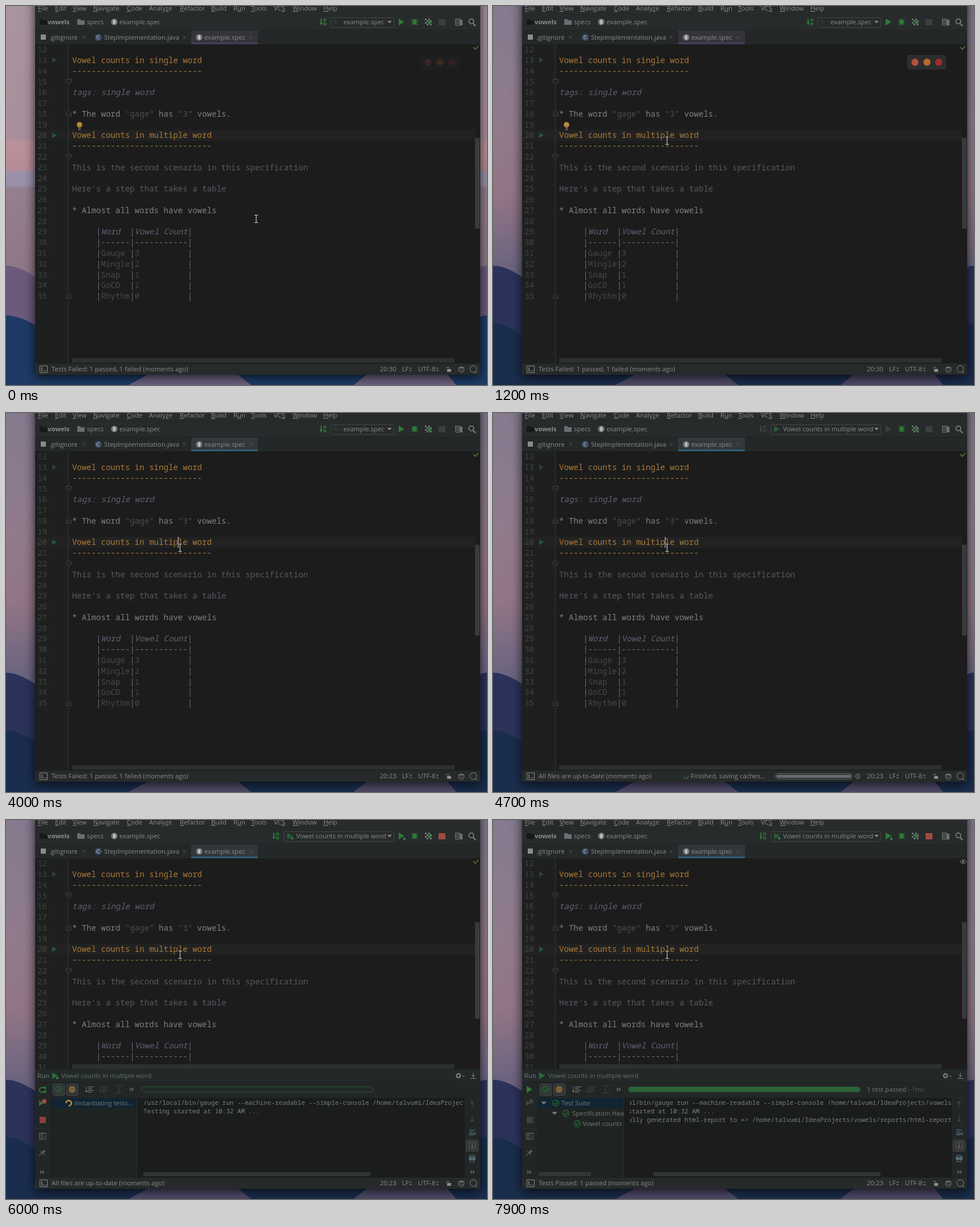
Animation of 844x664 px, one loop 8000 ms. Source, as an HTML page with a canvas:

```html
<!DOCTYPE html>
<html lang="en">
<head>
<meta charset="utf-8">
<title>Running a spec scenario</title>
<style>
  html, body { margin: 0; width: 100%; height: 100%; overflow: hidden; background: #14233c; }
  canvas { display: block; }
</style>
</head>
<body>
<canvas id="stage" width="844" height="664"></canvas>
<script>
const ctx = document.getElementById('stage').getContext('2d');
const LOOP = 8000, STEP = 100;
const COL = 8.451, ROW = 18.78, LOG_COL = 6.6;

const sans = "'Open Sans', 'Noto Sans', sans-serif";
const mono = "'Noto Sans Mono', monospace";
const UI = { css: '11.3px ' + sans, drop: 4 };
const BOLD = { css: 'bold 11.3px ' + sans, drop: 4 };
const CODE = { css: '14.085px ' + mono, drop: 4.9 };
const ITALIC = { css: 'italic 14.085px ' + mono, drop: 4.9 };
const LOG = { css: '11px ' + mono, drop: 3.9 };

const C = {
  bar: '#282b2b', editor: '#1c1c1c', gutter: '#1e1f1f', label: '#8b8c8c',
  icon: '#6d7070', dim: '#3f4242', green: '#2d7a38', red: '#a04a42',
  title: '#ab7a38', dash: '#a07a42', step: '#827e88', quote: '#4b5046',
  note: '#5b5762', tag: '#675f74', cell: '#464944', pipe: '#6f6880',
  panel: '#222626', panelText: '#747c78', panelIcon: '#525959', panelGreen: '#2a6a38'
};

// Drawing helpers
function rect(x, y, w, h, color) { ctx.fillStyle = color; ctx.fillRect(x, y, w, h); }
function frame(x, y, w, h, color, r = 0, fill) {
  ctx.beginPath();
  ctx.roundRect(x + .5, y + .5, w - 1, h - 1, r);
  if (fill) { ctx.fillStyle = fill; ctx.fill(); }
  ctx.strokeStyle = color; ctx.lineWidth = 1; ctx.stroke();
}
function trace(points) {
  ctx.beginPath();
  for (let i = 0; i < points.length; i += 2) ctx.lineTo(points[i], points[i + 1]);
}
function line(color, width, ...points) {
  trace(points);
  ctx.strokeStyle = color; ctx.lineWidth = width; ctx.stroke();
}
function poly(color, ...points) { trace(points); ctx.fillStyle = color; ctx.fill(); }
function dot(x, y, r, color) {
  ctx.beginPath(); ctx.arc(x, y, r, 0, 7);
  ctx.fillStyle = color; ctx.fill();
}
function ring(x, y, r, color, width = 1, from = 0, to = 2 * Math.PI) {
  ctx.beginPath(); ctx.arc(x, y, r, from, to);
  ctx.strokeStyle = color; ctx.lineWidth = width; ctx.stroke();
}
function text(str, x, y, color = C.label, font = UI) {
  ctx.font = font.css; ctx.fillStyle = color;
  ctx.fillText(str, x, y + font.drop);
}
function clipped(x, y, w, h, draw) {
  ctx.save();
  ctx.beginPath(); ctx.rect(x, y, w, h); ctx.clip();
  draw();
  ctx.restore();
}
function mix(t, keys) {
  const i = keys.findIndex(k => k[0] > t);
  if (i < 0) return keys[keys.length - 1][1];
  const [t0, a] = keys[i - 1], [t1, b] = keys[i];
  return a + (b - a) * (t - t0) / (t1 - t0);
}

// Icons
const play = (x, y, color = C.green, s = 5) => poly(color, x - s, y - s - 1, x + s, y, x - s, y + s + 1);
const down = (x, y, color = C.label, s = 4) => poly(color, x - s, y - s / 2, x + s, y - s / 2, x, y + s / 2);
function passed(x, y) {
  ring(x, y, 5.5, C.panelGreen, 1.3);
  line(C.panelGreen, 1.5, x - 3, y, x - .5, y + 2.5, x + 3.5, y - 2.5);
}
function cross(x, y, color = '#505353', s = 2.7) {
  line(color, 1, x - s, y - s, x + s, y + s);
  line(color, 1, x + s, y - s, x - s, y + s);
}
function chevrons(x, y) {
  for (const dx of [0, 4]) line(C.panelText, 1.2, x + dx, y - 2.5, x + dx + 2.5, y, x + dx, y + 2.5);
}
function folder(x, y, color) {
  rect(x - 6, y - 5, 6, 3, color);
  rect(x - 6, y - 3, 13, 8, color);
}
function specFile(x, y) {
  dot(x, y, 5.7, '#77797a');
  rect(x - 2, y - 3.5, 4, 7, '#c0c0c0');
}
function bug(x, y) {
  for (const d of [-3, 0, 3]) line(C.green, 1, x - 6, y + d * 1.4, x + 6, y + d * 1.4);
  dot(x, y, 4.2, C.green);
}
function coverage(x, y) {
  for (let i = 0; i < 16; i++) {
    if ((i + (i >> 2)) % 2 === 0) rect(x - 6 + i % 4 * 3, y - 6 + (i >> 2) * 3, 3, 3, C.icon);
  }
  play(x + 3, y + 1, C.green, 3.5);
}
function makeIcon(x, color) {
  poly(color, x - 6, 29, x, 29, x - 3, 34);
  rect(x - 4, 22, 2, 8, color);
  for (const y of [22, 29]) { rect(x + 1, y, 1.3, 5, color); frame(x + 3, y, 3, 5, color); }
}
function rows(x, y, color = C.icon, n = 4) {
  for (let i = 0; i < n; i++) rect(x - 5, y - 5 + i * 3, 10 - i % 2 * 3, 1.3, color);
}
function sorter(x, y, color) {
  line(color, 1.2, x - 4, y - 5, x - 4, y + 5);
  down(x - 4, y + 4, color, 3);
  rows(x + 4, y, color, 4);
}
function sizer(x, y) {
  down(x, y + 2.5, C.label, 2);
  poly(C.label, x - 2, y - 1.2, x + 2, y - 1.2, x, y - 3.5);
}

function wallpaper(dusk) {
  const sky = ctx.createLinearGradient(0, 0, 0, 664);
  const stops = dusk
    ? [[0, '#857a8e'], [.3, '#907b8d'], [.5, '#927586'], [.68, '#6d6580'], [1, '#4d4a6c']]
    : [[0, '#a8949f'], [.35, '#a98f9b'], [.36, '#bb929b'], [.43, '#b48d97'], [.44, '#9c92ab'], [.475, '#9a8fa8'], [.48, '#957f90'], [1, '#866c7d']];
  for (const [at, color] of stops) sky.addColorStop(at, color);
  rect(0, 0, 844, 664, sky);
  hill(455, 480, dusk ? '#2b335b' : '#6c5a7d');
  hill(dusk ? 556 : 542, dusk ? 582 : 562, dusk ? '#1a2d4c' : '#1e3b66');
  const mauve = dusk ? '#4f4a68' : '#6d6180';
  poly(mauve, 215, 664, 260, 640, 400, 640, 430, 664);
  poly(mauve, 610, 664, 640, 640, 770, 640, 790, 664);
}
function hill(left, right, color) {
  ctx.beginPath();
  ctx.moveTo(0, left);
  ctx.quadraticCurveTo(30, left, 70, right + 10);
  ctx.lineTo(760, right + 30);
  ctx.quadraticCurveTo(820, left, 844, left);
  ctx.lineTo(844, 664); ctx.lineTo(0, 664);
  ctx.fillStyle = color; ctx.fill();
}

function windowBase() {
  ctx.save();
  ctx.shadowColor = 'rgba(0,0,0,.75)'; ctx.shadowBlur = 18; ctx.shadowOffsetY = 4;
  rect(51, -20, 781, 666, C.bar);
  ctx.restore();
}

const MENU = [['File', 56, 0], ['Edit', 86, 0], ['View', 117, 0], ['Navigate', 153, 0], ['Code', 212, 0],
  ['Analyze', 251, 5], ['Refactor', 305, 0], ['Build', 360, 0], ['Run', 399, 1], ['Tools', 430, 0],
  ['VCS', 470, 2], ['Window', 503, 0], ['Help', 557, 0]];

function toolbar(s) {
  for (const [name, x, key] of MENU) {
    text(name, x, 3.5);
    const from = ctx.measureText(name.slice(0, key)).width;
    rect(x + from, 9, ctx.measureText(name[key]).width, 1, C.label);
  }
  rect(51, 14, 781, 1, '#252828');
  folder(65, 28, '#171919');
  text('vowels', 73, 28, C.label, BOLD);
  folder(131, 28, '#6b6e70');
  text('specs', 142, 28);
  specFile(190, 28);
  text('example.spec', 199, 28);

  makeIcon(s.picked ? 473 : 556, s.building ? C.dim : C.green);
  const left = s.picked ? 487 : 569;
  frame(left, 20, 681 - left, 18, '#424545', 2);
  play(left + 11, 28, s.picked ? '#28603a' : '#22382a', 4.5);
  if (s.panel) dot(left + 15, 32, 2, '#389149');
  text(s.picked ? 'Vowel counts in multiple word' : 'example.spec', s.picked ? 509 : 592, 28);
  down(673, 28);
  play(694, 28, s.building ? C.dim : C.green);
  if (s.panel) dot(699, 33, 2, '#389149');
  bug(717, 28);
  coverage(741, 28);
  rect(759, 23, 12, 11, s.panel ? C.red : '#3c3f3f');
  frame(788, 22, 9, 12, C.icon);
  rows(794, 29);
  rect(797, 24, 4, 10, C.icon);
  ring(816.5, 27, 4.2, C.label, 1.5);
  line(C.label, 1.8, 820, 31, 824, 35);
}

function tabs(s) {
  rect(51, 42, 781, 25, '#252828');
  rect(51, 42, 781, 1, '#1f2222');
  rect(325, 43, 117, 24, s.focused ? '#33373a' : '#353438');
  rect(325, 64, 117, 3, s.focused ? '#2d6079' : '#403f60');
  rect(61, 50, 9, 9, '#8b8b8b');
  text('.gitignore', 76, 55);
  dot(162, 55, 6, '#3c4d68');
  ring(162, 55, 2.6, '#9a9ca2', 1.2, .8, 5.5);
  text('StepImplementation.java', 172, 55);
  specFile(339, 55);
  text('example.spec', 348, 55);
  for (const x of [136, 313, 430]) cross(x, 55);
}

const rule = n => '-'.repeat(n);
const SPEC = [
  [13, 0, 'Vowel counts in single word', C.title],
  [14, 0, rule(27), C.dash],
  [16, 0, 'tags: single word', C.tag, ITALIC],
  [18, 0, '* The word        has     vowels.', C.step],
  [18, 11, '"gage"', C.quote],
  [18, 22, '"3"', C.quote],
  [20, 0, 'Vowel counts in multiple word', C.title],
  [21, 0, rule(29), C.dash],
  [23, 0, 'This is the second scenario in this specification', C.note],
  [25, 0, "Here's a step that takes a table", C.note],
  [27, 0, '* Almost all words have vowels', C.step]
];
const TABLE = [['Word', 'Vowel Count'], [rule(6), rule(11)],
  ['Gauge', 3], ['Mingle', 2], ['Snap', 1], ['GoCD', 1], ['Rhythm', 0]];
const rowY = n => 76.3 + (n - 12) * ROW;
const write = (row, col, str, color, font = CODE) => text(str, 116 + col * COL, rowY(row), color, font);

function foldMark(row, up) {
  const y = rowY(row), d = up ? -1 : 1;
  trace([105.5, y - 4 * d, 114.5, y - 4 * d, 114.5, y + d, 110, y + 5 * d, 105.5, y + d]);
  ctx.closePath();
  ctx.fillStyle = C.editor; ctx.fill();
  ctx.strokeStyle = '#464848'; ctx.lineWidth = 1; ctx.stroke();
  line('#505252', 1, 108, y, 112, y);
}

function editor(s) {
  const bottom = s.panel ? 437 : 626;
  clipped(51, 67, 781, bottom - 67, () => {
    rect(51, 67, 781, 560, C.editor);
    rect(51, 67, 59, 560, C.gutter);
    rect(51, 217, 772, 19, '#222222');
    rect(109, 67, 1, 560, '#343636');
    for (let n = 12; n <= 35; n++) write(n, -7.2, String(n), '#414343');
    play(85, rowY(13), '#234534', 4);
    dot(84, rowY(13), 1.5, '#4a3836');
    play(85, rowY(20), '#265636', 4);
    foldMark(15); foldMark(18, true); foldMark(22); foldMark(35, true);

    for (const item of SPEC) write(...item);
    TABLE.forEach(([word, count], i) => {
      const row = 29 + i, style = i ? CODE : ITALIC;
      const color = [C.tag, C.pipe][i] || C.cell;
      for (const col of [5, 12, 24]) write(row, col, '|', C.pipe);
      write(row, 6, word, color, style);
      write(row, 13, count, color, style);
    });

    if (s.bulb) {
      dot(129, 208, 4.8, '#b58a3c');
      rect(127, 211, 4, 3, '#8d6d34');
      rect(127, 215, 4, 2, '#77797a');
    }
    if (s.caret) rect(301.5, 217, 1.5, 19, '#a5a5a5');

    rect(823, s.panel ? 179 : 231, 8, s.panel ? 169 : 159, '#393b3b');
    rect(116, bottom - 9, 671, 8, '#2e2f2f');
    if (s.analysing) {
      ctx.beginPath(); ctx.ellipse(825, 73, 5, 3.3, 0, 0, 7);
      ctx.strokeStyle = C.label; ctx.lineWidth = 1; ctx.stroke();
      dot(825, 73, 1.8, C.label);
    } else line('#5a7038', 1.8, 820, 72, 823.5, 76, 829, 70);
  });
  if (s.browsers > 0) {
    ctx.globalAlpha = s.browsers;
    frame(727, 86, 68, 25, '#303232', 2, '#2b2e2e');
    dot(740.5, 98.5, 6.2, '#b5503f');
    dot(761.5, 98.5, 6.2, '#b5692c');
    dot(782, 98.5, 6.2, '#a22b31');
    ctx.globalAlpha = 1;
  }
}

function runPanel(s) {
  rect(51, 437, 781, 189, C.panel);
  rect(51, 437, 781, 22, '#232929');
  rect(51, 459, 781, 1, '#1c2020');
  text('Run', 55, 448, C.panelText);
  play(86, 448, C.panelGreen);
  if (!s.done) dot(90, 452, 2, '#389149');
  text('Vowel counts in multiple word', 97, 448, '#66706b');
  ring(794, 448, 3.2, C.panelText, 2.6);
  down(803, 449, C.panelText, 2);
  line(C.panelText, 1.2, 820, 443, 820, 449);
  down(820, 449, C.panelText, 3);
  rect(815, 452, 10, 1.2, C.panelText);

  // Left strip
  if (s.done) play(64, 472);
  else {
    ring(63, 473, 4.3, C.green, 1.8, .3, 5.2);
    poly(C.green, 64, 467, 70, 467, 70, 473);
    rect(66, 474, 4, 4, C.green);
  }
  play(62, 496, s.done ? C.dim : C.green, 4);
  dot(67, 493, 4, s.done ? C.dim : C.red);
  rect(59, 520, 11, 11, s.done ? C.dim : '#8a4039');
  rect(51, 540, 26, 1, '#2b3030');
  frame(58, 548, 13, 12, C.panelIcon);
  rows(64, 554, C.panelIcon);
  line(C.panelIcon, 1.5, 58, 588, 63, 583);
  line(C.panelIcon, 1.5, 60, 580, 67, 587);
  line(C.panelIcon, 4, 63, 584, 68, 579);
  chevrons(60, 617);

  // Test toolbar
  for (const x of [82, 106]) frame(x, 462, 21, 21, '#434848', 2, '#303535');
  passed(92.5, 472);
  dot(116, 472, 6, '#7f6537');
  rect(111, 471, 10, 1, '#5f4b2e');
  sorter(145, 472, C.icon);
  sorter(170, 472, C.dim);
  line(C.dim, 1.3, 192, 466, 204, 466);
  line(C.dim, 1.3, 192, 478, 204, 478);
  line(C.dim, 1.3, 198, 468, 198, 476);
  chevrons(217, 472);
  frame(237, 467, 408, 10, '#2a5535', 5, s.done ? '#2b6238' : '#202926');
  if (s.done) {
    text('1 test passed', 656, 472, C.panelText);
    text(' - 1ms', 656 + ctx.measureText('1 test passed').width, 472, '#535a57');
  }

  // Test tree
  rect(78, 487, 152, 139, '#1f2423');
  rect(79, 487, 150, 18, '#122431');
  clipped(78, 487, 151, 139, () => {
    const mark = (x, y) => s.done ? passed(x, y)
      : ring(x, y, 4.6, '#b58b3e', 2.8, s.spin, s.spin + 4.7);
    mark(110, 496);
    if (!s.suite) return text('Instantiating tests...', 120, 496, C.panelText);
    text('Test Suite', 120, 496, C.panelText);
    down(89, 496, C.panelText, 5);
    down(108, 514, C.panelText, 5);
    mark(128, 514);
    text('Specification Heading', 139, 514, C.panelText);
    mark(148, 532);
    text('Vowel counts in multiple word', 157, 532, C.panelText);
    rect(80, 617, 92, 7, '#313636');
  });

  // Console
  rect(229, 487, 576, 139, '#1b1c1c');
  rect(229, 487, 1, 139, '#292d2d');
  const home = '/home/talvumi/IdeaProjects/vowels';
  const log = ['/usr/local/bin/gauge run --machine-readable --simple-console ' + home + '/specs/example.spec:20',
    'Testing started at 10:32 AM ...'];
  if (s.done) log.push('Successfully generated html-report to => ' + home + '/reports/html-report/index.html');
  clipped(240, 487, 564, 128, () => log.forEach((str, i) =>
    text(str, 241 - (s.done ? 8.6 * LOG_COL : 0), 495 + i * 15, '#78807c', LOG)));
  rect(s.done ? 282 : 241, 617, 398, 7, '#313434');

  // Right strip
  const steel = '#4c626c';
  for (const [y, d] of [[498, -1], [523, 1]]) {
    line(C.dim, 1.5, 818, y - 5, 818, y + 5);
    down(818, y + 4 * d, C.dim, 4 * d);
  }
  rows(818, 547, steel, 4);
  line(steel, 1.3, 812, 551, 824, 551, 824, 546);
  frame(807, 560, 22, 21, '#434848', 2, '#303535');
  frame(812, 564, 12, 12, '#655663');
  line('#75525b', 1.5, 818, 566, 818, 572);
  down(818, 573, '#75525b', 3);
  rect(812, 590, 12, 6, steel);
  frame(814, 587, 8, 12, '#65757b');
  chevrons(815, 617);
}

function statusBar(s) {
  rect(51, 626, 781, 20, '#272a2a');
  rect(51, 626, 781, 1, '#202323');
  frame(59, 630, 14, 13, C.label);
  rect(62, 633, 2, 7, C.icon);
  rect(62, 639, 9, 1, C.icon);
  text(s.status, 80, 636);
  if (s.building) {
    ring(339, 637, 3.5, '#386b47', 1.6, s.spin, s.spin + 4);
    text('Finished, saving caches...', 347, 636);
    frame(495, 631, 136, 11, '#5a5d5d', 5, '#343737');
    rect(498, 634, 130, 5, '#686b6b');
    dot(640, 636.5, 5, '#4b4e4e');
    cross(640, 636.5, '#272a2a', 2);
  }
  text(s.focused ? '20:23' : '20:30', 656, 636);
  text('LF', 695, 636); sizer(710, 636.5);
  text('UTF-8', 723, 636); sizer(757, 636.5);
  rect(774, 636, 7, 5, C.label);
  ring(775, 635, 2.3, C.label, 1, 3.1, 6.3);
  ring(799, 637, 4.8, C.icon, 1.2);
  rect(794, 633, 10, 2, C.icon);
  line(C.icon, 1, 796, 638, 802, 638);
  ring(820, 636, 5.8, C.icon, 1.2);
  line(C.icon, 1.5, 823, 640, 826, 643);
}

function pointer(x, y) {
  for (const [color, w] of [['#111111', 3], ['#c4c4c4', 1.3]]) {
    line(color, w, x, y - 6, x, y + 6);
    for (const d of [-6.5, 6.5]) line(color, w, x - 3, y + d, x + 3, y + d);
  }
}

const within = (t, ...spans) => spans.some(([a, b]) => t >= a && t < b);

function stateAt(t) {
  const done = t >= 7600;
  return {
    done,
    dusk: t >= 1200,
    focused: t >= 1300,
    picked: t >= 4500,
    building: within(t, [4500, 4900]),
    panel: t >= 4900,
    suite: t >= 7300,
    analysing: t >= 7700,
    bulb: within(t, [0, 1300], [2100, 3900]),
    caret: within(t, [1300, 2300], [3000, 3300], [4000, 5800], [6300, 6800], [7300, 7800]),
    browsers: mix(t, [[0, .16], [100, .16], [400, 0], [500, 0], [1000, 1], [3100, 1], [3300, 0]]),
    spin: t / STEP * Math.PI / 4,
    status: done ? 'Tests Passed: 1 passed (moments ago)'
      : t >= 4600 ? 'All files are up-to-date (moments ago)'
      : 'Tests Failed: 1 passed, 1 failed (moments ago)',
    x: mix(t, [[0, 439], [100, 439], [200, 372], [300, 318], [400, 306], [500, 306], [1000, 305.5]]),
    y: mix(t, [[0, 373], [100, 373], [200, 308], [300, 261], [400, 250], [500, 250], [1000, 236]])
  };
}

function draw(now) {
  const s = stateAt(Math.floor(now % LOOP / STEP) * STEP);
  wallpaper(s.dusk);
  windowBase();
  toolbar(s);
  tabs(s);
  editor(s);
  if (s.panel) runPanel(s);
  statusBar(s);
  pointer(s.x, s.y);
}

const start = performance.now();
function tick() {
  draw(performance.now() - start);
  requestAnimationFrame(tick);
}
tick();
</script>
</body>
</html>
```
